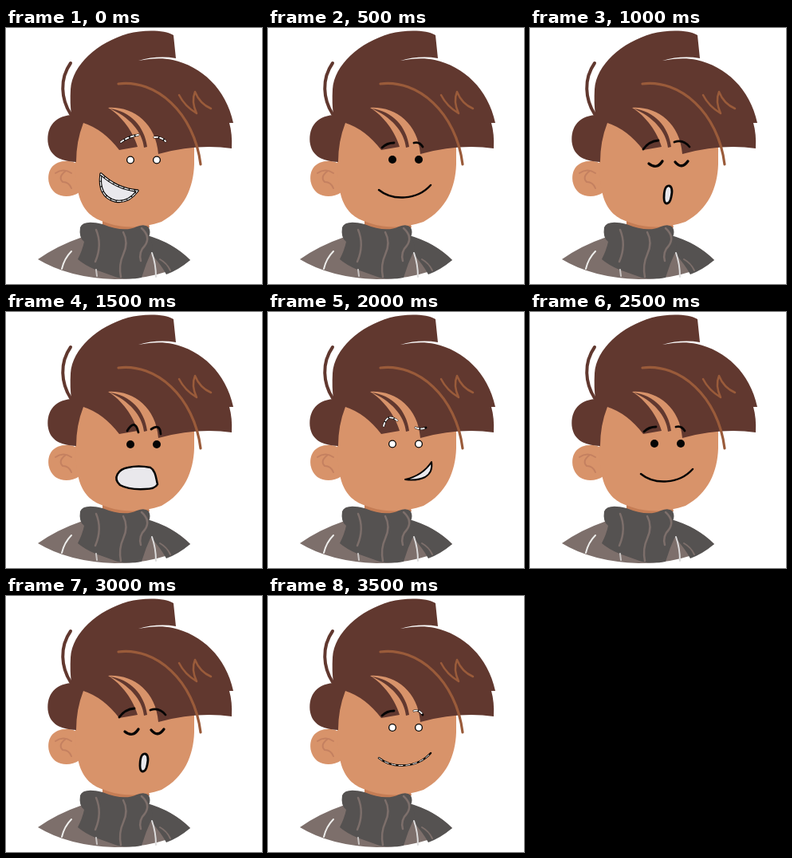
An HTML page with a canvas that plays this animation: 321x321 px, repeating every 4 s.

```html
<!DOCTYPE html>
<html lang="en">
<head>
<meta charset="utf-8">
<style>
html, body { margin: 0; width: 100%; height: 100%; overflow: hidden; background: #fff; }
canvas { display: block; width: 321px; height: 321px; }
</style>
</head>
<body>
<canvas id="stage" width="321" height="321"></canvas>
<script>
const ctx = document.getElementById('stage').getContext('2d');
const HAIR = '#61382f', SKIN = '#d8936a', NECK = '#c57d55', EAR_LINE = '#c48060', STRAND = '#9a5b3a';
const SCARF = '#555251', SWEATER = '#7d6f6b', INK = '#050505', TEETH = '#e9e8ec';

function fill(d, color) {
  ctx.fillStyle = color;
  ctx.fill(new Path2D(d));
}

function line(d, color, width, dash = []) {
  ctx.strokeStyle = color;
  ctx.lineWidth = width;
  ctx.setLineDash(dash);
  ctx.stroke(new Path2D(d));
}

function dot(x, y, r, color) {
  ctx.fillStyle = color;
  ctx.beginPath();
  ctx.arc(x, y, r, 0, Math.PI * 2);
  ctx.fill();
}

function drawBody() {
  fill('M40 290Q64 273 96 262L180 262Q210 270 231 291Q195 315 136 315Q78 313 40 290Z', SWEATER);
  fill('M177 260Q209 269 231 291Q217 303 201 309Q194 296 181 282Z', SCARF);
  fill('M93 250Q97 240 121 246Q148 257 164 249Q174 245 179 250Q182 256 179 262Q185 270 183 279'
    + 'Q175 296 170 313Q154 316 140 313L112 303Q98 297 90 290Q96 278 98 268Q91 263 93 250Z', SCARF);
  line('M82 280Q73 289 70 302', '#eeeeec', 2);
  line('M183 282Q188 296 188 312', '#dddcdc', 2);
  line('M113 303L114 311', '#c9c5c4', 2);
  line('M113 253Q121 272 112 293', SWEATER, 2.5);
  line('M147 256Q154 269 147 284Q141 297 144 312', SWEATER, 2.5);
  line('M170 251Q182 262 174 273Q166 281 169 292', SWEATER, 2.5);
  line('M193 290Q202 295 206 304', SWEATER, 2);
}

function drawHead() {
  fill('M121 238V250L148 259L180 250L176 235Z', NECK);
  fill('M90 171C80 164 64 166 57 175C50 185 53 200 62 207C71 213 83 212 92 206Z', SKIN);
  line('M62 182Q72 175 82 182M74 180Q65 187 71 193Q79 193 82 201', EAR_LINE, 2);
  fill('M96 116C86 145 84 182 92 212C98 231 110 239 123 243C145 252 172 251 195 243'
    + 'C224 227 235 200 236 171V143L200 110L130 95Z', SKIN);
}

function drawHair() {
  fill('M82 109C58 111 50 128 53 146C56 160 67 167 88 168Q88 142 97 119'
    + 'Q122 127 142 153L165 149C160 131 145 110 128 100'
    + 'C158 98 188 118 191 158Q239 145 283 151Q284 133 280 119L285 119'
    + 'C276 76 245 48 209 40C196 37 181 38 166 41Q190 34 213 38L210 9'
    + 'C199 2 172 2 153 7C115 18 83 46 81 77Q80 94 82 109Z', HAIR);
  fill('M130 101C156 104 174 124 177 149L173 150C171 130 154 111 130 101Z', HAIR);
  line('M81 44C67 64 69 89 81 108', HAIR, 4);
  line('M141 70C188 64 236 106 244 171', STRAND, 3.2);
  line('M217 84Q224 98 239 107Q232 92 237 80Q243 95 257 101', STRAND, 2.5);
}

function brow(d, light) {
  line(d, INK, 2.8);
  if (light) line(d, '#fff', 1.8, [4, 3]);
}

function eyes(y, light) {
  for (const x of [156, 189]) {
    dot(x, y, 5, INK);
    if (light) dot(x, y, 3.7, '#fff');
  }
}

function mouth(d, width) {
  fill(d, TEETH);
  line(d, INK, width);
}

function laugh() {
  const lips = 'M119 183Q139 202 165 204Q153 220 137 217Q115 211 119 183Z';
  brow('M144 143Q154 136 166 134', true);
  brow('M186 137Q194 136 200 142', true);
  eyes(165.5, true);
  mouth(lips, 3.4);
  line(lips, '#fff', 1.2, [5, 2]);
}

function smile(light) {
  const lips = 'M139 203C156 217 187 216 204 197';
  brow('M143 150Q149 144 158 144');
  brow('M183 144Q190 142 194 149', light);
  eyes(165, light);
  line(lips, INK, 2.5);
  if (light) line(lips, '#fff', 1, [5, 4]);
}

function sing() {
  brow('M142 152Q149 142 161 141');
  brow('M181 143Q192 139 200 149');
  line('M149 170Q159 178 166 167M182 168Q190 178 198 167', INK, 3.3);
  mouth('M173 198C178 197 179 204 177 212C175 222 168 223 168 213C168 205 169 199 173 198Z', 2.8);
}

function shout() {
  brow('M152 149Q162 133 166 151');
  brow('M182 147Q193 139 194 153');
  eyes(166, false);
  mouth('M153 195Q166 192 181 195C188 199 188 209 190 216Q187 222 174 222Q154 223 143 217C133 208 141 197 153 195Z', 2.5);
}

function smirk() {
  brow('M145 143Q149 126 162 136', true);
  brow('M185 145Q192 148 198 145', true);
  eyes(165.5, true);
  mouth('M172 210Q194 205 205 188Q207 201 197 207Q187 212 172 210Z', 2);
}

const softSmile = () => smile(false);
const brightSmile = () => smile(true);
const poses = [laugh, softSmile, sing, shout, smirk, softSmile, sing, brightSmile];
const POSE_MS = 500;
const start = performance.now();

function render(now) {
  const time = Math.max(0, now - start);
  ctx.fillStyle = '#fff';
  ctx.fillRect(0, 0, 321, 321);
  ctx.lineCap = ctx.lineJoin = 'round';
  drawHead();
  drawBody();
  drawHair();
  poses[Math.floor(time / POSE_MS) % poses.length]();
  requestAnimationFrame(render);
}

render(start);
</script>
</body>
</html>
```
